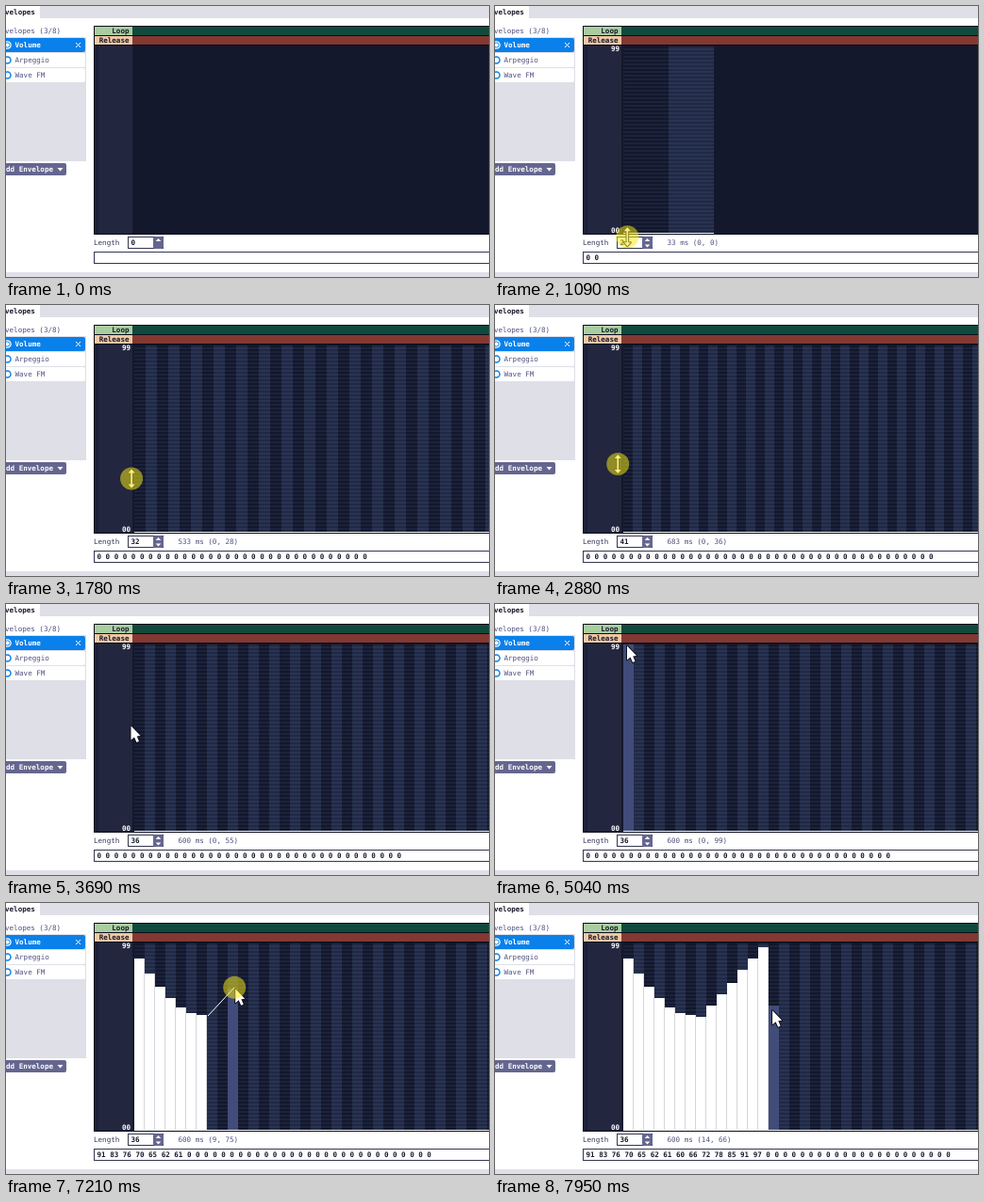
These frames come from a looping animation (512x288 px, 8 s). An HTML page with a canvas:

```html
<!DOCTYPE html>
<html lang="en">
<head>
<meta charset="utf-8">
<title>Envelope editor</title>
<style>
html, body { margin: 0; height: 100%; overflow: hidden; background: #fff; }
canvas { display: block; width: 100vw; height: 100vh; }
</style>
</head>
<body>
<canvas id="stage" width="512" height="288"></canvas>
<script>
const ctx = document.getElementById('stage').getContext('2d');
const LOOP = 8000, LEFT = 136, TOP = 43, BASE = 241, PLOT_WIDTH = 412, MAX_BAR = 48;
const GREY = '#dfdfe8', SLATE = '#65668f', LABEL = '#4f5080', INK = '#181a2c', BLUE = '#0a80ea';

const clamp = (v, lo, hi) => Math.max(lo, Math.min(hi, v));
const progress = (t, from, to) => clamp((t - from) / (to - from), 0, 1);
const within = (t, span) => t >= span.from && t < span.to;
const smooth = f => f * f * (3 - 2 * f);
const linear = f => f;
const settle = f => 1 - (1 - f) ** 1.6;

// Spans with the button held, each ending at x, y.
const resize = { from: 890, to: 2150, x: 131, y: 167 };
const adjust = { from: 2740, to: 3250, x: 127, y: 178 };
const draw = { from: 5060, to: 6240, x: 203, y: 119, easeX: linear, easeY: settle };
const line = { from: 6870, to: 7640, x: 282, y: 47 };
const start = { x: 388, y: 288 };
const moves = [
  { from: 70, to: 760, x: 141, y: 251 },
  resize,
  adjust,
  { from: 3250, to: 4310, x: 139, y: 45 },
  { from: 4970, to: 5040, x: 139, y: 43 },
  draw,
  { from: 6600, to: 6670, x: 214, y: 120 },
  line,
  { from: 7640, to: 8080, x: 296, y: 130 }
];

function pointerAt(t) {
  let { x, y } = start;
  for (const { from, to, x: endX, y: endY, easeX = smooth, easeY = smooth } of moves) {
    const f = progress(t, from, to);
    x += (endX - x) * easeX(f);
    y += (endY - y) * easeY(f);
  }
  return { x, y };
}

function lengthAt(t) {
  const grown = Math.floor(41 * smooth(progress(t, resize.from, resize.to)));
  return grown - Math.round(5 * smooth(progress(t, 2880, adjust.to)));
}

const curve = i => Math.floor(61 + 30 * (1 - i / 6) ** 1.7);
const ramp = i => Math.round(59.9 + (i - 7) * 37 / 6);

function barValue(i, t, column, level) {
  if (t < draw.from || i > 13) return 0;
  if (i > 6) return t < line.to ? 0 : ramp(i);
  if (t >= draw.to || i < column) return curve(i);
  return i === column ? level : 0;
}

function rect(x, y, w, h, color) {
  ctx.fillStyle = color;
  ctx.fillRect(x, y, w, h);
}

function text(str, x, y, color, bold = false, align = 'left') {
  ctx.font = `${bold ? 'bold ' : ''}7.56px "DejaVu Sans Mono", monospace`;
  ctx.textAlign = align;
  ctx.fillStyle = color;
  ctx.fillText(str, x, y);
}

function polygon(points, fill, stroke) {
  ctx.beginPath();
  points.forEach(([x, y]) => ctx.lineTo(x, y));
  ctx.closePath();
  if (stroke) {
    ctx.strokeStyle = stroke;
    ctx.lineWidth = 2;
    ctx.lineJoin = 'round';
    ctx.stroke();
  }
  ctx.fillStyle = fill;
  ctx.fill();
}

function roundBox(x, y, w, h, color) {
  ctx.beginPath();
  ctx.roundRect(x, y, w, h, 2);
  ctx.fillStyle = color;
  ctx.fill();
}

function triangle(x, y, half, height, color) {
  polygon([[x - half, y], [x + half, y], [x, y + height]], color);
}

function frameBox(x, y, w, h) {
  rect(x, y, w, h, '#34364f');
  rect(x + 1, y + 1, w - 2, h - 2, '#fff');
}

function ring(x, y, radius, color, width) {
  ctx.beginPath();
  ctx.arc(x, y, radius, 0, 7);
  ctx.fillStyle = '#fff';
  ctx.fill();
  ctx.lineWidth = width;
  ctx.strokeStyle = color;
  ctx.stroke();
}

function strokeLine(x1, y1, x2, y2) {
  ctx.beginPath();
  ctx.moveTo(x1, y1);
  ctx.lineTo(x2, y2);
  ctx.strokeStyle = '#fff';
  ctx.lineWidth = 1;
  ctx.stroke();
}

function drawSidebar() {
  rect(0, 0, 512, 288, '#fff');
  rect(36, 0, 476, 13, GREY);
  rect(0, 283, 512, 5, GREY);
  text('velopes', -1, 9, INK, true);
  text('velopes (3/8)', -1, 29, LABEL);
  rect(0, 33, 85, 132, GREY);
  ['Volume', 'Arpeggio', 'Wave FM'].forEach((name, i) => {
    const y = 34 + i * 16;
    roundBox(-4, y, 88, 15, i ? '#fff' : BLUE);
    ring(1.5, y + 7.5, 3.5, i ? BLUE : '#fff', 1.5);
    if (!i) ring(1.5, y + 7.5, 2.6, BLUE, 1);
    text(name, 9.5, y + 10, i ? LABEL : '#fff', !i);
  });
  strokeLine(74, 39, 79, 44);
  strokeLine(79, 39, 74, 44);
  roundBox(-4, 167, 68, 13, SLATE);
  text('dd Envelope', 0, 176, '#fff', true);
  triangle(57.5, 172, 3, 3.5, '#fff');
}

function drawPanel() {
  rect(93, 21, 419, 222, '#0a0d19');
  rect(94, 22, 40, 9, '#a9cda0');
  rect(134, 22, 378, 9, '#104a3d');
  rect(94, 32, 40, 9, '#f2c9a6');
  rect(134, 32, 378, 9, '#833832');
  text('Loop', 130.5, 29, INK, true, 'right');
  text('Release', 130.5, 39, INK, true, 'right');
  rect(94, 42, 40, 200, '#22263f');
  rect(94, 42, 4, 200, '#1c2038');
  rect(134, 42, 378, 200, '#13182c');
}

function drawBars(values, width, hover, level) {
  values.forEach((value, i) => {
    const x = LEFT + i * width, top = BASE - 2 * value, lit = i === hover;
    rect(x, TOP, width, BASE - TOP, i % 2 ? '#202944' : '#12172b');
    for (let y = TOP + 2; y < BASE; y += 4) rect(x, y, width, 2, i % 2 ? '#293352' : '#1c223b');
    if (lit) rect(x, BASE - 2 * level, width, 2 * level, '#424c7a');
    rect(x, top, width, BASE + 1 - top, lit && value ? '#b3d8f3' : '#fff');
    if (value) rect(x + width - 1, top, 1, BASE - top, lit ? '#a5cae6' : '#d5d6da');
  });
}

function drawFields(values, status) {
  const count = values.length;
  text('Length', 93, 254, '#34365c');
  frameBox(129, 245, 38, 13);
  roundBox(156, 245, 11, 13, SLATE);
  triangle(161.5, 250, 2.8, -3, '#fff');
  if (count) triangle(161.5, 253.5, 2.8, 3, '#fff');
  text(String(count), 132.5, 254, INK, true);
  if (count) text(status, 182.5, 253.5, LABEL);
  frameBox(93, 261, 425, 13);
  text(values.join(' '), 96.5, 270, INK, true);
}

function drawPointer(x, y, resizing, pressed) {
  ctx.save();
  ctx.translate(x, y);
  if (resizing) {
    polygon([[0, -10], [3.5, -6], [0.8, -6], [0.8, 6], [3.5, 6], [0, 10],
      [-3.5, 6], [-0.8, 6], [-0.8, -6], [-3.5, -6]], '#fff', '#15182b');
  } else {
    polygon([[1, 1.5], [1, 16.5], [4.5, 13.5], [7, 19], [9.5, 18], [7.2, 12.5], [11, 12]],
      '#fff', '#10121f');
  }
  if (pressed) {
    ctx.beginPath();
    ctx.arc(0, 0, 12, 0, 7);
    ctx.fillStyle = 'rgba(246,232,20,0.53)';
    ctx.fill();
  }
  ctx.restore();
}

function render(t) {
  const { x, y } = pointerAt(t);
  const count = lengthAt(t);
  const width = count ? Math.min(MAX_BAR, Math.floor(PLOT_WIDTH / count)) : MAX_BAR;
  // The readout trails the pointer slightly.
  const level = clamp(Math.round((BASE - pointerAt(t - 15).y) / 2), 0, 99);
  const column = clamp(Math.floor((x - LEFT) / width), 0, Math.max(0, count - 1));
  const resizing = t >= resize.from && t < adjust.to;
  const hover = !resizing && x >= LEFT && y < BASE ? column : -1;
  const values = Array.from({ length: count }, (_, i) => barValue(i, t, column, level));

  drawSidebar();
  drawPanel();
  if (count) {
    drawBars(values, width, hover, level);
    text('99', 132, 48, '#fff', true, 'right');
    text('00', 132, 241, '#fff', true, 'right');
  }
  drawFields(values, `${Math.round(count * 1000 / 60)} ms (${column}, ${level})`);

  const drawingLine = within(t, line);
  if (drawingLine) strokeLine(214, 120, x, y);
  if (t >= 70) drawPointer(x, y, resizing, resizing || drawingLine || within(t, draw));
}

function tick() {
  render(performance.now() % LOOP);
  requestAnimationFrame(tick);
}
tick();
</script>
</body>
</html>
```
